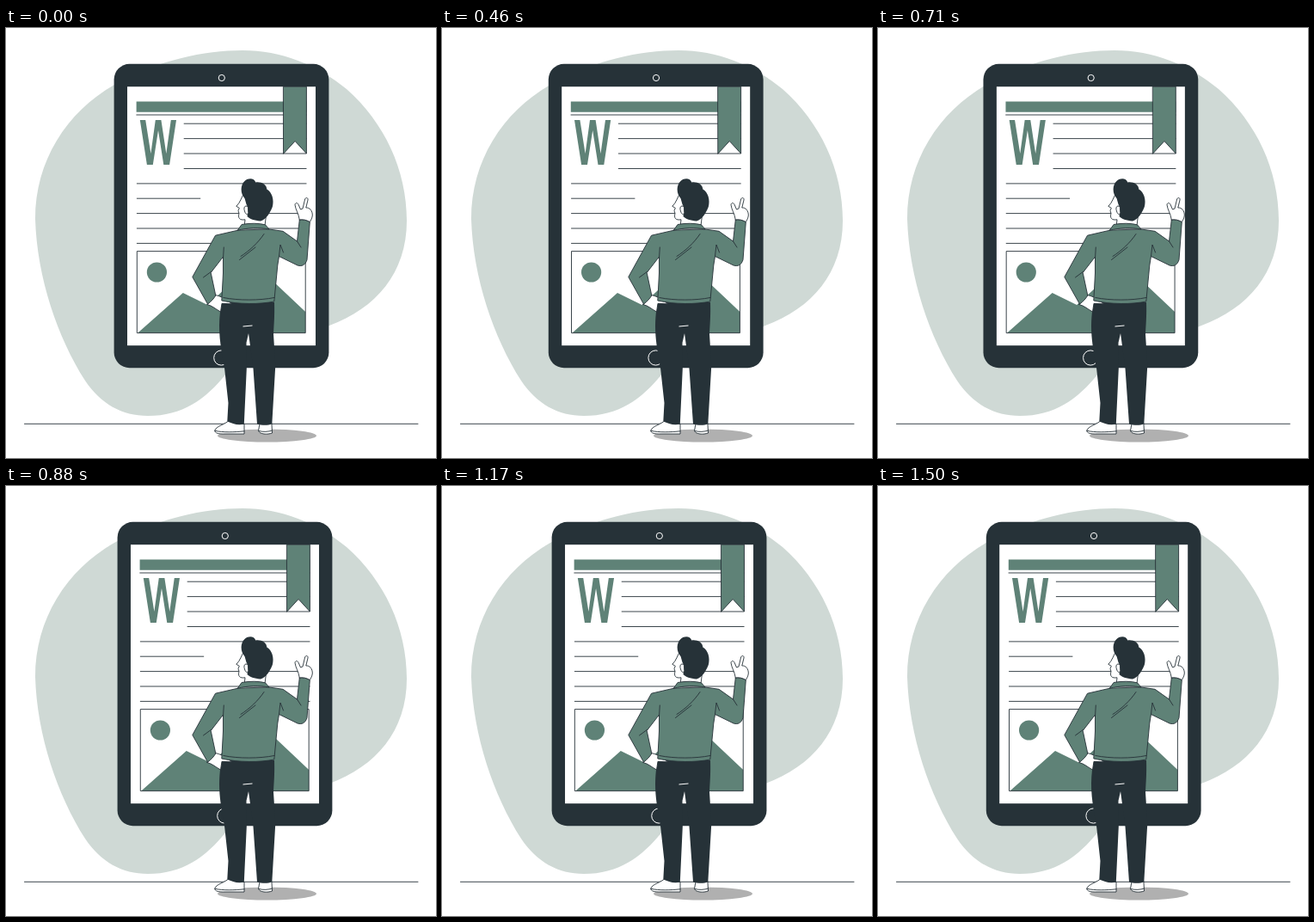
Animation of 500 by 500 pixels, one loop 1540 ms. Source, as an HTML page:

```html
<!DOCTYPE html>
<html lang="en">
<head>
<meta charset="utf-8">
<title>Reading on a tablet</title>
<style>
  html, body { margin: 0; width: 100%; height: 100%; overflow: hidden; background: #fff; }
  svg { display: block; width: 100vw; height: 100vh; }
  .dark { fill: #263238; }
  .green { fill: #5f8277; }
  .white { fill: #fff; }
  .ink { stroke: #263238; stroke-width: .9; stroke-linejoin: round; stroke-linecap: round; }
  .line { fill: none; }
  .ring { fill: none; stroke: #fff; }
</style>
</head>
<body>
<svg viewBox="0 0 500 500">
  <path fill="#cfd9d5" d="M275 26C230 26 178 37 126 66C70 98 34 155 34 222C36 290 60 360 92 410C110 437 135 451 165 451C205 451 232 432 256 402C290 362 340 362 376 346C430 326 466 285 466 224C466 165 440 110 396 71C362 43 320 26 275 26Z"/>
  <path class="ink line" d="M21.5 460.3H479"/>
  <ellipse cx="303.5" cy="474" rx="57.5" ry="7.5" fill="#b0b0b0"/>

  <g id="tablet">
    <rect class="dark" x="125.8" y="41.8" width="249.8" height="353.4" rx="18"/>
    <rect class="white" x="141.2" y="68.2" width="219" height="301"/>
    <circle class="ring" cx="251" cy="58" r="3.6"/>
    <circle class="ring" cx="250.5" cy="383.5" r="8.6"/>
    <path class="green" d="M151.8 85.6H349.6V97.8H151.8Z"/>
    <path class="ink line" d="M152 101H349.3M207.3 111.2H349.3M207.3 128.6H349.3M207.3 146H349.3M207.3 163.5H349.3M152.5 180.9H349.3M152.5 198.2H226M152.5 215.6H349.3M152.5 233H349.3M152.5 250.4H349.3"/>
    <path class="green" d="M156 107h6.4L168.6 146L174 107h6.6L186.5 146L192 107h6.2L190.3 159h-6.8L177.2 119L171 159h-6.9Z"/>
    <path class="white" d="M152.9 259.6H348.4V354.6H152.9Z"/>
    <circle class="green" cx="175.6" cy="284" r="11.6"/>
    <path class="green" d="M153.5 354.5L206 308L234.5 322L288 273L348.4 330V354.5Z"/>
    <path class="ink line" d="M152.9 259.6H348.4V354.6H152.9Z"/>
    <path class="green ink" d="M323 68.2H349.6V146L336.3 131.5L323 146Z"/>
  </g>

  <!-- shoes and trousers -->
  <path class="white ink" d="M259 456.5C255 461 244 463 242.8 468C242.5 471 247 472.3 255 472H277V461Z"/>
  <path class="ink line" d="M243 468.3C252 470.5 266 470 277 468.8"/>
  <path class="white ink" d="M295 460L293.5 468.5C295 472.5 304 473 309.5 471L309 460Z"/>
  <path class="ink line" d="M294 468.5C299 470 305 469.5 309.5 468"/>
  <path class="dark" d="M250.5 318L312 319C312.5 335 311.5 345 311 356L313.3 392L309.3 460.5C304 462.5 297 462 292 460.5L287.5 396L282 355L279.5 366L279.8 396L276.8 460.5C270 462.5 263 460 257.3 457.5L258.5 436L254 395C249 368 246.5 352 249 330Z"/>
  <path class="ring" d="M275.5 347L286.5 346"/>

  <!-- left hand, then the jacket -->
  <path class="white ink" d="M234 321.5L243 310.5C249 311.5 256 315 262.5 320.8L251 320.3L249.5 330C244 327 240 323 234 321.5Z"/>
  <path class="green ink" d="M269.5 235.2L243.5 241.2L216.8 289.5L234.5 321C238.5 318 241.5 315 243.8 311L238.2 284.5L252.5 266L252.5 285L250.8 317C270 321.5 295 321.5 311.8 318L315.8 276L317.5 265.5L339 276C343.5 277.5 348 276 350 269.5L353.3 225.5C349 223 345 222.3 341.3 223L338.5 248L322 236.3L306 234Z"/>
  <path class="ink line" d="M252.8 313.5C270 317 295 317 312 313.5M229.5 290L239 283M252.5 268L253.3 255M317.5 265.5L319 252L322.5 261M338.5 248L343 255M300 239.5C293 250 283 259 273 265.5M290 255L271.5 269.5"/>

  <!-- raised hand -->
  <path class="white ink" d="M341.3 223C340.5 216 336.5 211 336 205.5C336.5 202.8 339 203 340 205.2L342.5 211L345 210L347.7 198.8C349 196.5 351.5 197.5 351 200L348.8 209C353 208.5 356.5 212.5 356.3 218C356 221 354.5 223.5 353.3 225.5C349 223 345 222.3 341.3 223Z"/>

  <!-- head and collar -->
  <path class="white ink" d="M277 192C273.5 197 272.5 203 267.8 207.3L271.3 209.3L270 212.5L271 215.5C269.5 221 271.5 223.8 278 222.8L277.3 229L301 230L304 205Z"/>
  <path class="dark" d="M277.5 198C272.5 193 272 182 278 177.5C282 174 289 174.5 290.3 179.5C297 178.5 303 182 303.3 187.5C309.5 191 312 200 309.8 208C306.5 216 303 222 296 224.5C289 224 283 222 280.5 219L281.5 209L279.5 205Z"/>
  <path class="white ink" d="M281 207.5C277.5 205.5 276 209 277.5 213C278.5 217 281 217.5 281.7 215Z"/>
  <path class="green ink" d="M269.3 235.3L274 228.5C283 226.8 294 226.8 301.5 228.8L306 234C294 231.8 281 232.3 269.3 235.3Z"/>
</svg>
<script>
  const LOOP = 1540, CYCLE = 1500, STEP = 1000 / 24, LEAD = 0.7;
  const stops = [0, -1, 2, -4, 4, -4, 4, -4, 2, -1, 0];
  const tablet = document.getElementById('tablet');
  let start;

  function shake(p) {
    const s = Math.min(p, 1) * (stops.length - 1);
    const i = Math.min(Math.floor(s), stops.length - 2);
    return stops[i] + (stops[i + 1] - stops[i]) * (s - i);
  }

  // The shake moves in 24 fps steps.
  function draw(now) {
    start ??= now;
    const step = Math.min(Math.floor(((now - start) % LOOP + 5) / STEP), 36);
    const x = shake((step + LEAD) * STEP / CYCLE);
    tablet.setAttribute('transform', `translate(${x.toFixed(3)} 0)`);
    requestAnimationFrame(draw);
  }
  requestAnimationFrame(draw);
</script>
</body>
</html>
```
